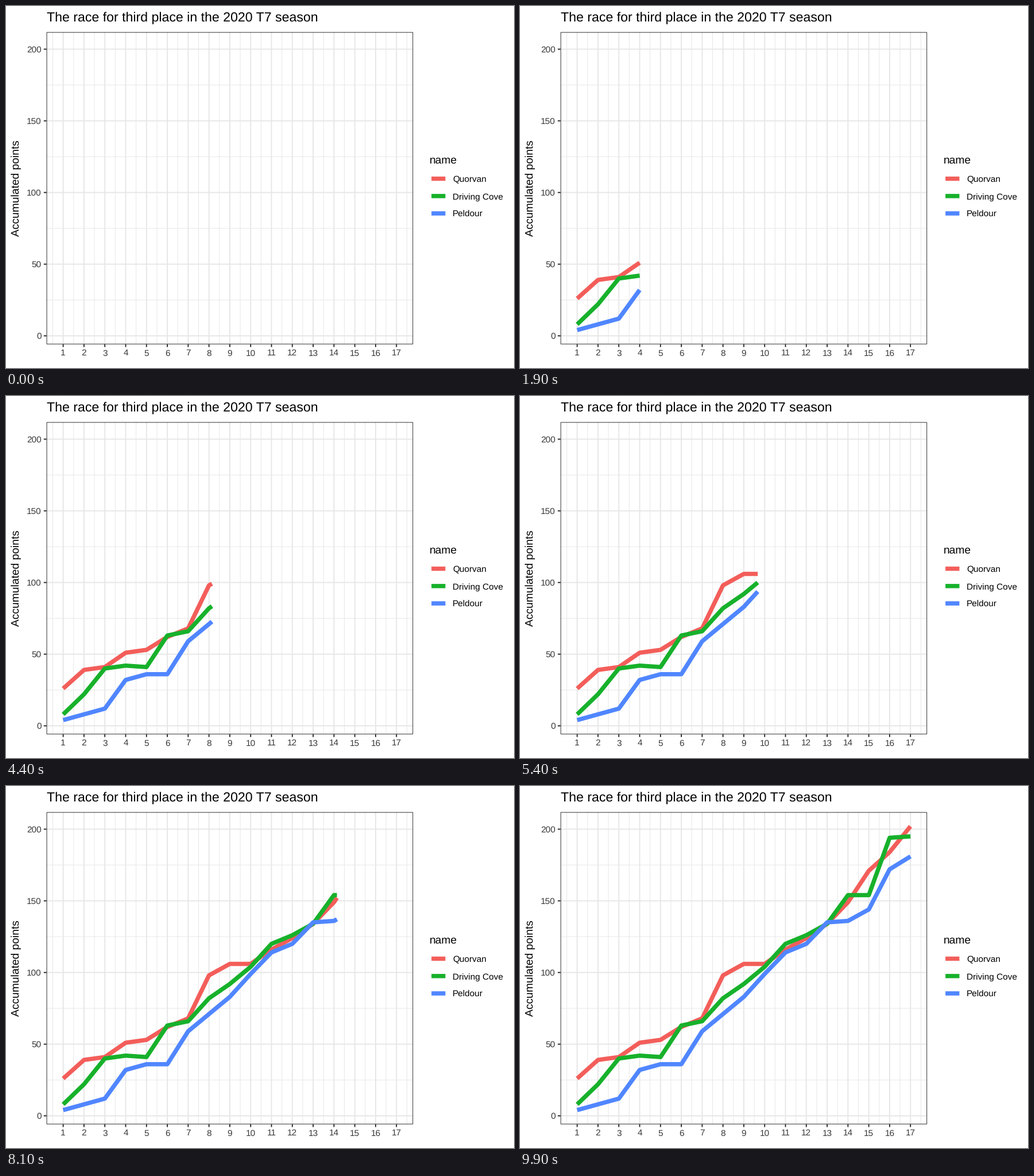
A matplotlib script for the animation above (10 s loop, 885x632 px).

```python
import numpy as np
import matplotlib.pyplot as plt
from matplotlib.animation import FuncAnimation
from matplotlib.patches import Rectangle

W, H, DPI = 885, 632, 64
FRAMES, INTERVAL = 100, 100
PT = 72 / DPI  # points per pixel

plt.rcParams.update({
    "font.family": "Liberation Sans",
    "text.hinting": "none",
    "path.snap": False,
})

GRID, DARK, LABEL = "#e6e6e6", "#222222", "#383838"
LEFT, RIGHT, TOP, BOTTOM = 70.6, 709.2, 45.6, 590.6
THIN, THICK, BOLD = 0.93, 1.87, 7.47
SMALL, MEDIUM, LARGE = 15.44, 19.3, 23.17

TEAMS = [
    ("Quorvan", "#f35e5a", [26, 39, 41, 51, 53, 62, 68, 98, 106, 106,
                            116, 124, 134, 149, 171, 184, 202]),
    ("Driving Cove", "#17b12b", [8, 22, 40, 42, 41, 63, 66, 82, 92, 104,
                                 120, 126, 134, 154, 154, 194, 195]),
    ("Peldour", "#5086ff", [4, 8, 12, 32, 36, 36, 59, 71, 83, 99,
                            114, 120, 135, 136, 144, 172, 181]),
]
ROUNDS = np.arange(1, 18)
# Each round is reached on a whole frame, with linear motion in between.
KEYS = np.round((ROUNDS - 1) * (FRAMES - 1) / 16)

fig = plt.figure(figsize=(W / DPI, H / DPI), dpi=DPI, facecolor="white")
ax = fig.add_axes([0, 0, 1, 1])
ax.set(xlim=(0, W), ylim=(H, 0))
ax.axis("off")


def px(x):
    return 99.6 + (np.asarray(x) - 1) * 36.29


def py(y):
    return 575.8 - np.asarray(y) * 2.502


def line(xs, ys, color, width, z):
    return ax.plot(xs, ys, color=color, lw=width * PT, zorder=z,
                   solid_capstyle="butt", solid_joinstyle="round")[0]


def text(x, y, s, size, color="black", ha="left", **kw):
    ax.text(x, y, s, size=size * PT, color=color, ha=ha, va="baseline", **kw)


def vgrid(values, width, z):
    for x in px(values):
        line([x, x], [TOP, BOTTOM], GRID, width, z)


def hgrid(values, width, z):
    for y in py(values):
        line([LEFT, RIGHT], [y, y], GRID, width, z)


def draw_panel():
    hgrid(range(25, 200, 50), THIN, 1)
    vgrid(np.arange(0.5, 18), THIN, 1)
    hgrid(range(0, 201, 50), THICK, 2)
    vgrid(ROUNDS, THICK, 2)
    inset = THIN / 2
    ax.add_patch(Rectangle((LEFT + inset, TOP + inset),
                           RIGHT - LEFT - THIN, BOTTOM - TOP - THIN,
                           fill=False, ec=DARK, lw=THIN * PT, zorder=5))


def draw_axes():
    for n in ROUNDS:
        x = px(n)
        line([x, x], [BOTTOM, BOTTOM + 4.8], DARK, THICK, 4)
        text(x, 610.4, str(n), SMALL, LABEL, "center")
    for v in range(0, 201, 50):
        y = py(v)
        line([LEFT - 4.8, LEFT], [y, y], DARK, THICK, 4)
        text(61.9, y + 5.5, str(v), SMALL, LABEL, "right")
    text(23.5, 318.1, "Accumulated points", MEDIUM, ha="center",
         rotation=90, rotation_mode="anchor")
    text(70.6, 27, "The race for third place in the 2020 T7 season", LARGE)


def draw_legend():
    text(738, 274.7, "name", MEDIUM)
    for i, (name, color, _) in enumerate(TEAMS):
        y = 301.5 + 30.3 * i
        line([741.2, 765.5], [y, y], color, BOLD, 3)
        text(778, y + 5.8, name, SMALL)


draw_panel()
draw_axes()
draw_legend()
curves = [line([], [], color, BOLD, 3) for _, color, _ in TEAMS]


def update(i):
    passed = KEYS < i
    tip = np.interp(i, KEYS, ROUNDS)
    xs = np.append(ROUNDS[passed], tip)
    for curve, (_, _, points) in zip(curves, TEAMS):
        curve.set_data(px(xs), py(np.interp(xs, ROUNDS, points)))
    return curves


anim = FuncAnimation(fig, update, frames=FRAMES, interval=INTERVAL,
                     repeat=True, repeat_delay=0)
plt.show()
```
